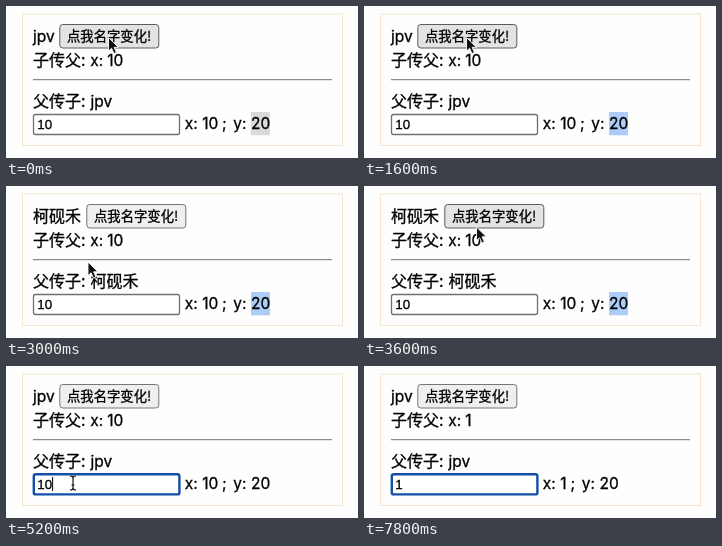
Recreate the animation shown at these times as an HTML page. Size 352 by 152 pixels, loop 8 s.

```html
<!DOCTYPE html>
<html lang="zh-CN">
<head>
<meta charset="utf-8">
<title>父子组件传值</title>
<style>
  html, body { margin: 0; width: 100%; height: 100%; overflow: hidden; background: #fefefe; }
  svg { display: block; width: 352px; height: 152px; }
  text { font: 15.5px Inter, "Noto Sans CJK SC", "Noto Sans CJK", sans-serif; fill: #000; stroke: #000; stroke-width: .3; white-space: pre; }
  .cjk { font: 16px "Noto Sans CJK SC", "Noto Sans CJK", sans-serif; }
  .label { font: 13.33px "Noto Sans CJK SC", "Noto Sans CJK", sans-serif; }
  .field { font: 13.33px "Liberation Sans", Arial, sans-serif; }
</style>
</head>
<body>
<svg viewBox="0 0 352 152">
  <rect x="16.5" y="8" width="320" height="131.5" fill="#fefefe" stroke="#f4e6d0"/>
  <text id="name" x="27" y="36"></text>
  <g id="button">
    <rect id="face" x="53.8" y="18.5" width="99" height="23.5" rx="3"/>
    <text class="label" x="61" y="35">点我名字变化!</text>
  </g>
  <text class="cjk" x="27" y="60">子传父:</text>
  <text x="84.3" y="60">x:</text>
  <text id="parentX" x="101.3" y="60"></text>
  <path d="M27 73.7H326" stroke="#8c8c8c" stroke-width="1.2"/>
  <text class="cjk" x="27" y="101">父传子:</text>
  <text id="childName" x="84.5" y="101"></text>
  <rect id="box" fill="#fff"/>
  <text id="value" class="field" x="31.3" y="123"></text>
  <rect id="caret" y="111" width="1" height="14"/>
  <text x="178.8" y="123.3">x:</text>
  <text id="childX" x="196.2" y="123.3"></text>
  <g id="tail">
    <rect id="selection" x="245" y="106" width="19" height="23.3"/>
    <text x="216" y="123.3">;</text>
    <text x="227.2" y="123.3">y:</text>
    <text x="245" y="123.3">20</text>
  </g>
  <path id="arrow" d="M0 0V13.6L3.1 10.8 5.4 16 7.9 15 5.6 9.8H9.8Z" fill="#111" stroke="#fff" stroke-width=".9"/>
  <path id="beam" d="M-3-7Q0-7 0-5Q0-7 3-7M0-5V5M-3 7Q0 7 0 5Q0 7 3 7M-1.5 2H1.5" fill="none" stroke="#111" stroke-width="1.2"/>
</svg>
<script>
const LOOP = 8000, STEP = 100, DIGIT = 9.5;
const $ = id => document.getElementById(id);
const set = (id, attrs) => {
  for (const key in attrs) $(id).setAttribute(key, attrs[key]);
};
const show = (id, on) => set(id, { visibility: on ? "visible" : "hidden" });

// Each row: start time, value held until the next row
const names = [[0, "jpv"], [2500, "柯砚禾"], [3900, "jpv"]];
const values = [[0, "10"], [5600, "100"], [5800, "1000"], [6000, "10000"], [6200, "100000"],
  [6900, "10000"], [7100, "1000"], [7400, "100"], [7600, "10"], [7800, "1"]];
const selections = [[0, "#dadada"], [500, "#abcdf8"], [4800, "none"]];
const carets = [[0, false], [4800, true], [5300, false], [5600, true], [6700, false], [6900, true], [7800, false]];
// Pointer: time, x, y
const moves = [[0, 102.5, 31.5], [2600, 102.5, 31.5], [2900, 82, 76], [3300, 82, 76],
  [3600, 112.5, 41], [4000, 112.5, 41], [4700, 67, 117], [LOOP, 67, 117]];

const held = (rows, t) => rows.findLast(row => row[0] <= t)[1];

function pointerAt(t) {
  const i = moves.findIndex(row => row[0] > t);
  const [t0, x0, y0] = moves[i - 1], [t1, x1, y1] = moves[i];
  const p = (t - t0) / (t1 - t0), e = p * p * (3 - 2 * p);
  return [x0 + (x1 - x0) * e, y0 + (y1 - y0) * e];
}

function draw(t) {
  const name = held(names, t), value = held(values, t);
  const chinese = name > "z";
  const focused = t >= 4800;
  const shift = chinese ? 27 : 0;
  const [x, y] = pointerAt(t);

  for (const id of ["name", "childName"]) {
    $(id).textContent = name;
    set(id, { class: chinese ? "cjk" : "" });
  }
  for (const id of ["value", "parentX", "childX"]) $(id).textContent = value;

  const hover = x > 53 + shift && x < 153 + shift && y > 18 && y < 42;
  set("button", { transform: `translate(${shift})` });
  set("face", { fill: hover ? "#e3e3e3" : "#efefef", stroke: hover ? "#5c5c5c" : "#767676" });

  set("box", focused
    ? { x: 27.8, y: 108.2, width: 145.6, height: 20.2, rx: 2, stroke: "#124fa6", "stroke-width": 2.4 }
    : { x: 27.5, y: 108.5, width: 146, height: 20, rx: 2, stroke: "#707070", "stroke-width": 1.3 });
  set("caret", { x: 31.3 + value.length * 7.41 });
  show("caret", held(carets, t));

  set("tail", { transform: `translate(${(value.length - 2) * DIGIT})` });
  set("selection", { fill: held(selections, t) });

  const inField = y > 108 && x < 174;
  for (const id of ["arrow", "beam"]) set(id, { transform: `translate(${x} ${y})` });
  show("arrow", !inField);
  show("beam", inField && t < 5600);
}

const start = performance.now();
function tick() {
  const t = (performance.now() - start) % LOOP;
  draw(Math.floor(t / STEP) * STEP);
  requestAnimationFrame(tick);
}
tick();
</script>
</body>
</html>
```
